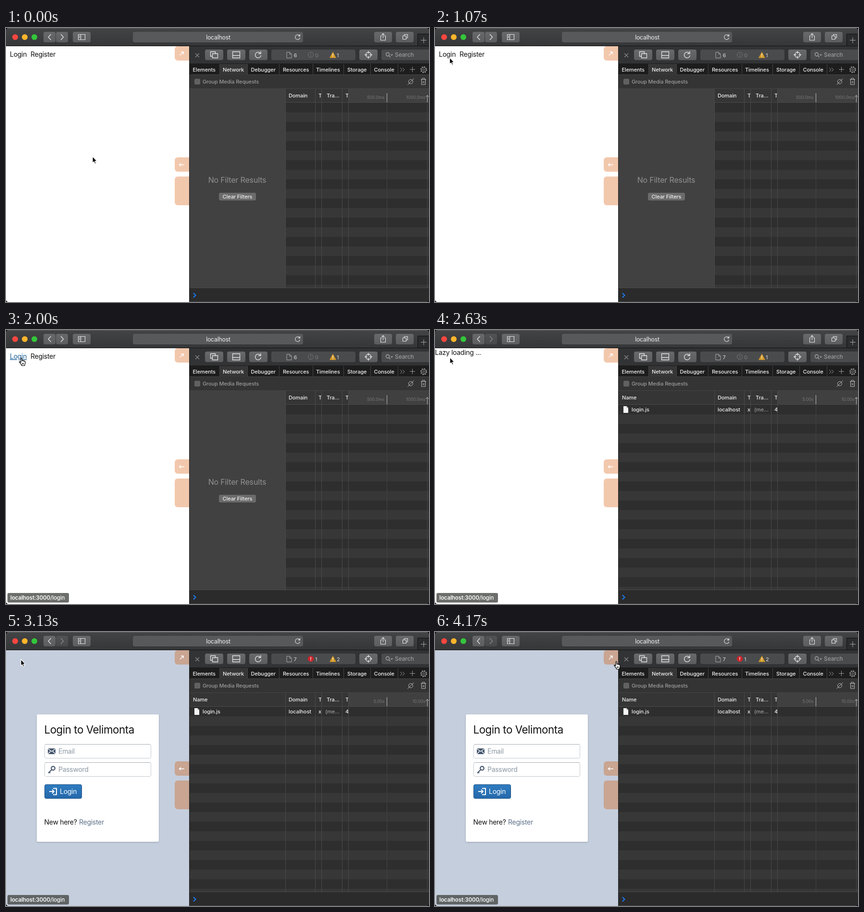
These frames come from a looping animation (880x572 px, 4210 ms). An HTML page:

```html
<!DOCTYPE html>
<html lang="en">
<meta charset="utf-8">
<title>Lazy loading demo</title>
<style>
html, body { margin: 0; width: 100%; height: 100%; overflow: hidden; background: #000 }
svg { display: block; border-radius: 5px; overflow: hidden }
text { font: 500 11px Inter, "Open Sans", sans-serif; letter-spacing: -.01em; fill: #f0f0f0; white-space: pre }
.page { font-size: 14px; font-weight: 400; letter-spacing: -.02em; fill: #111 }
.dim { fill: #9b9b9b }
.tick { font-size: 9px; font-weight: 400; fill: #777; text-anchor: end }
.mid { text-anchor: middle }
.btn rect { fill: url(#key) }
.line { fill: none; stroke: #e6e6e6; stroke-width: 1.3 }
.off { opacity: .45 }
</style>
<svg width="880" height="572" viewBox="0 0 880 572">
  <defs>
    <linearGradient id="bar" x2="0" y2="1"><stop stop-color="#434446"/><stop offset="1" stop-color="#353638"/></linearGradient>
    <linearGradient id="key" x2="0" y2="1"><stop stop-color="#68696b"/><stop offset="1" stop-color="#5c5d5f"/></linearGradient>
    <linearGradient id="blue" x2="0" y2="1"><stop stop-color="#2f7cc0"/><stop offset="1" stop-color="#2468ab"/></linearGradient>
    <pattern id="rows" y="156" width="40" height="40" patternUnits="userSpaceOnUse">
      <path fill="#2e2e2e" d="M0 0h40v20H0z"/><path fill="#373737" d="M0 20h40v20H0z"/>
    </pattern>
    <filter id="soft" x="-10%" y="-10%" width="120%" height="120%"><feDropShadow dx="0" dy="1" stdDeviation="1.5" flood-opacity=".25"/></filter>
  </defs>

  <!-- browser bar -->
  <path fill="url(#bar)" d="M0 0h880v38H0z"/>
  <path fill="#626365" d="M0 0h880v1H0z"/>
  <path fill="#2b2c2e" d="M857 13h23v24h-23z"/>
  <path fill="#111" d="M0 37h880v1H0zM856 13h1v24h-1zM856 12h24v1h-24z"/>
  <circle cx="19" cy="19" r="6" fill="#f9463f"/>
  <circle cx="39" cy="19" r="6" fill="#fdb52b"/>
  <circle cx="59" cy="19" r="6" fill="#34c63b"/>
  <g class="btn">
    <rect x="78" y="8" width="25" height="22" rx="4"/>
    <rect x="139" y="8" width="37" height="22" rx="4"/>
    <rect x="766" y="8" width="37" height="22" rx="4"/>
    <rect x="811" y="8" width="37" height="22" rx="4"/>
  </g>
  <g id="forward" class="btn"><rect x="104" y="8" width="25" height="22" rx="4"/><path class="line" stroke-width="1.6" d="M114 13l5.5 6-5.5 6"/></g>
  <rect x="264" y="8" width="354" height="22" rx="4" fill="#58595b"/>
  <g class="line">
    <path d="M93.500 13l-5.500 6 5.500 6"/>
    <path d="M150.500 13.500h14v11h-14zM155.500 13.500v11M152 16.500h2M152 18.500h2M152 20.500h2" stroke-width="1.100"/>
    <path d="M611 16.500a5 5 0 1 0 .500 4M611.500 13v4h-4" stroke-width="1.100"/>
    <path d="M782 16.500h-2.500v9h10v-9H787M784.500 21v-9M781.500 14.500l3-3 3 3" stroke-width="1.100"/>
    <path d="M825.500 16.500h7v7h-7zM828.500 16v-2.500h7v7H833" stroke-width="1.100"/>
    <path d="M863 25.500h12M869 19.500v12" stroke="#aaa" stroke-width="1"/>
  </g>
  <text class="mid" x="441.500" y="23.500" style="font-size:12.400px;font-weight:400;letter-spacing:-.02em">localhost</text>

  <!-- web page -->
  <path id="paper" d="M0 38h381v534H0z"/>
  <g id="home">
    <text id="link" class="page" x="8" y="60">Login</text>
    <text class="page" x="51" y="60">Register</text>
  </g>
  <text id="lazy" class="page" x="0" y="52">Lazy loading ...</text>
  <g id="login">
    <rect x="64" y="172" width="254" height="266" rx="3" fill="#fff" filter="url(#soft)"/>
    <text class="page" x="79.500" y="212" style="font-size:22.300px">Login to Velimonta</text>
    <g fill="#fff" stroke="#c3c9cf">
      <rect x="80.500" y="234.500" width="221" height="29" rx="3"/>
      <rect x="80.500" y="272.500" width="221" height="29" rx="3"/>
      <path stroke="#a5adb4" d="M82 234.500h218M82 272.500h218"/>
    </g>
    <path fill="#47586f" d="M87 243h16v12H87z"/>
    <path fill="none" stroke="#fff" stroke-width="1.300" d="M87 243.500l8 6 8-6M87 255l5.500-6M103 255l-5.500-6"/>
    <g fill="none" stroke="#47586f" stroke-width="2.200"><circle cx="98" cy="284.500" r="3.800"/><path d="M95 287.500l-7 7M89.500 292l2.500 2.500"/></g>
    <text class="page" x="109" y="254" style="fill:#8a97a3">Email</text>
    <text class="page" x="109" y="292" style="fill:#8a97a3">Password</text>
    <rect x="80.500" y="318.500" width="77" height="29" rx="3" fill="url(#blue)" stroke="#1d4f80"/>
    <path fill="none" stroke="#fff" stroke-width="2" d="M98 326.500h7v13h-7M90 333h9M96 329l4 4-4 4"/>
    <text class="page" x="112" y="338" style="fill:#fff">Login</text>
    <text class="page" x="79.500" y="402">New here?</text>
    <text class="page" x="152" y="402" style="fill:#5c6f88">Register</text>
  </g>
  <g id="tabs">
    <path d="M381 38h-23q-7 0-7 7v16q0 7 7 7h23zM381 270h-23q-7 0-7 7v16q0 7 7 7h23zM381 310h-23q-7 0-7 7v46q0 7 7 7h23z"/>
    <path fill="none" stroke="#fff" stroke-width="1.400" d="M362 57l7-7M364 50h5v5M371 285.500h-10.500M364 282.500l-3.500 3 3.500 3"/>
  </g>
  <g id="status">
    <rect x="3" y="549" width="128" height="20" rx="3" fill="#484a46" fill-opacity=".8"/>
    <text x="9" y="563" style="font-size:11.500px;font-weight:600;fill:#fff">localhost:3000<tspan font-weight="500">/login</tspan></text>
  </g>

  <!-- inspector -->
  <path fill="#323335" d="M381 38h499v534H381z"/>
  <g class="btn">
    <rect x="414" y="45" width="38" height="22" rx="4"/>
    <rect x="460" y="45" width="38" height="22" rx="4"/>
    <rect x="506" y="45" width="38" height="22" rx="4"/>
    <rect x="735" y="45" width="38" height="22" rx="4"/>
  </g>
  <g fill="#4a4b4d"><rect x="552" y="45" width="175" height="22" rx="4"/><rect x="781" y="45" width="110" height="22" rx="4"/></g>
  <g class="line">
    <path stroke="#888" d="M394 53l8 8M402 53l-8 8"/>
    <path d="M429 59h-3.500v-9.500h10V53M429.500 53.500h11v9h-11z"/>
    <path d="M471.500 49.500h15v13h-15zM471.500 57.500h15"/>
    <path d="M529.500 53a6 6 0 1 0 1 4M530 48.500v5h-5"/>
    <path stroke="#aaa" stroke-width="1" d="M584 50.500h6l4 4v8h-10zM590 50.500v4h4"/>
    <circle cx="754" cy="56" r="5.500"/><path d="M754 48v5.500M754 58.500V64M746 56h5.500M756.500 56h5.500"/>
    <g stroke="#aaa"><circle cx="794" cy="55" r="3.500"/><path d="M796.500 57.500l3 3.500M800.500 55l2 2 2-2"/></g>
  </g>
  <text class="dim" x="809" y="60" style="font-size:12px">Search</text>
  <text id="files" x="598.500" y="60.500" style="fill:#c5c5c5"></text>
  <g id="noError" fill="none" stroke="#777"><circle cx="634" cy="56" r="5.500"/><path d="M634 53v4M634 58v1.500"/></g>
  <g id="error"><path fill="#c8252c" d="M631.500 50h5l3.500 3.500v5l-3.500 3.500h-5l-3.500-3.500v-5z"/><path stroke="#fff" stroke-width="1.300" d="M634 52.500v4.500M634 58v1.500"/></g>
  <text id="errors" x="643" y="60.500"></text>
  <path fill="#d59a25" d="M680 49.500l7 13h-14z"/><path stroke="#fff" stroke-width="1.200" d="M680 53.500v4.500M680 59.500v1.500"/>
  <text id="warnings" x="688" y="60.500" style="fill:#c5c5c5"></text>

  <path fill="#1d1d1e" d="M381 74h499v24H381z"/>
  <path fill="#363636" d="M445 75h57v23h-57z"/>
  <path fill="#343434" d="M381 98h499v28H381z"/>
  <path fill="#454545" d="M444 75h1v22h-1zM502 75h1v22h-1zM568 75h1v22h-1zM638 75h1v22h-1zM702 75h1v22h-1zM758 75h1v22h-1zM815 75h1v22h-1zM381 97h64v1h-64zM502 97h378v1H502zM381 126h499v1H381z"/>
  <g id="tabNames"></g>
  <g class="line" stroke="#999" style="stroke:#999;stroke-width:1">
    <path d="M820 83l4 4-4 4M825 83l4 4-4 4M840 86.500h11M845.500 81v11"/>
    <circle cx="869" cy="87" r="2"/><circle cx="869" cy="87" r="4.800"/><circle cx="869" cy="87" r="6" stroke-width="2" stroke-dasharray="2.350"/>
    <g style="stroke:#bbb"><circle cx="842" cy="112" r="4.500"/><path d="M835.500 118.500l13-13M863 107.500h11M866 107v-2h5v2M864.500 108v10h8v-10M866.500 111l4 4M870.500 111l-4 4"/></g>
  </g>
  <rect x="392" y="106" width="12" height="12" rx="2.500" fill="#616161"/>
  <text class="dim" x="409" y="116">Group Media Requests</text>

  <path fill="#353535" d="M381 127h332v29H381z"/>
  <path fill="#404040" d="M713 127h167v29H713z"/>
  <path fill="url(#rows)" d="M381 156h499v386H381z"/>
  <text x="588" y="145">Domain</text>
  <text x="650" y="145">T</text>
  <text x="667" y="145">Tra...</text>
  <text x="706" y="145">T</text>
  <g id="request">
    <text x="389" y="145">Name</text>
    <path fill="#f5f5f5" d="M392 159h6.500l3.500 3.500V173h-10z"/><path fill="#aaa" d="M398.500 159v3.500h3.500z"/>
    <text x="409" y="170">login.js</text>
    <text x="588" y="170">localhost</text>
    <text x="650" y="170">x</text>
    <text class="dim" x="664" y="170">(me...</text>
    <text x="706" y="170">4</text>
  </g>
  <path fill="#4a4a4a" d="M581 127h1v415h-1zM643 127h1v415h-1zM656 127h1v415h-1zM699 127h1v415h-1zM712 127h1v415h-1zM381 155h499v1H381z"/>
  <path fill="#444" d="M792 156h1v386h-1zM876 156h1v386h-1z"/>
  <path fill="none" stroke="#bbb" d="M792.500 136v19M876.500 141v14M873 144l3.500-3.500 3.500 3.500"/>
  <text id="half" class="tick" x="787.500" y="148"></text>
  <text id="full" class="tick" x="872.500" y="148"></text>
  <g id="empty">
    <path fill="#414141" d="M381 127h200v415H381z"/>
    <text class="mid" x="481" y="323" style="font-size:16px;font-weight:400;fill:#929292">No Filter Results</text>
    <rect x="443" y="344" width="77" height="16" rx="3" fill="#6b6b6b"/>
    <text class="mid" x="481.500" y="356">Clear Filters</text>
  </g>

  <path fill="#2b2b2c" d="M381 543h499v29H381z"/>
  <path fill="#4a4a4a" d="M381 542h499v1H381zM381 571h499v1H381z"/>
  <path fill="#222" d="M381 38h1v534h-1z"/>
  <path fill="none" stroke="#1a7df5" stroke-width="2" d="M390 553.500l4.500 4.500-4.500 4.500"/>

  <!-- pointer -->
  <g id="pointer" stroke-linejoin="round">
    <path id="arrow" stroke="#fff" stroke-width="1.200" d="M0 0v13.600l3-2.700 2 4.700 2.200-.9-2-4.600h4.100z"/>
    <path id="hand" transform="translate(-5)" fill="#fff" stroke="#000" stroke-width="1.200" d="M4 10V1.800Q4 .5 5.200.5T6.400 1.800V6.500Q6.500 5.600 7.600 5.700T8.800 6.900Q9 6 10 6.200T11 7.400Q11.400 6.800 12.200 7.100T13 8.600V11Q13 13 11.800 14.500V16.500H5.500V15Q3 12 .8 9.200.3 7.800 1.700 7.900 3 8.600 4 10M7.200 11v3M9.200 11v3"/>
  </g>
</svg>
<script>
const LOOP = 4210, HOVER = 1130, CLICK = 2330, LOADED = 2670;
// pointer stops: time, x, y
const stops = [[0, 180, 268], [570, 16, 114], [1130, 31, 60], [1370, 31, 60], [2000, 32, 58],
  [2200, 31, 57], [3350, 31, 57], [4100, 377, 61], [LOOP, 377, 61]];
const tabs = { Elements: 388.5, Network: 451, Debugger: 509.5, Resources: 576, Timelines: 645, Storage: 710, Console: 765.5 };
const $ = id => document.getElementById(id);
const show = (id, on) => $(id).style.display = on ? '' : 'none';
const write = (id, text) => $(id).textContent = text;

$('tabNames').innerHTML = Object.entries(tabs).map(([name, x]) => `<text x="${x}" y="91">${name}</text>`).join('');

function pointerAt(t) {
  const i = stops.findIndex(s => s[0] > t);
  const [t0, x0, y0] = stops[i - 1], [t1, x1, y1] = stops[i];
  const u = (t - t0) / (t1 - t0), e = u * u * (3 - 2 * u);
  return [x0 + (x1 - x0) * e, y0 + (y1 - y0) * e];
}

function draw(now) {
  const t = now % LOOP, clicked = t >= CLICK, loaded = t >= LOADED;
  const hover = t >= HOVER && !clicked;
  const [x, y] = pointerAt(t);
  const hand = hover || (loaded && x >= 351);

  show('home', !clicked);
  show('lazy', clicked && !loaded);
  show('login', loaded);
  show('status', t >= HOVER);
  show('empty', !clicked);
  show('request', clicked);
  show('error', loaded);
  show('noError', !loaded);
  show('hand', hand);
  show('arrow', !hand);

  $('paper').style.fill = loaded ? '#c5cedd' : '#fff';
  $('tabs').style.fill = loaded ? '#c9a592' : '#f2c8ad';
  $('link').style.fill = hover ? '#1c5f96' : '';
  $('link').style.textDecoration = hover ? 'underline' : '';
  $('forward').setAttribute('class', clicked ? 'btn off' : 'btn');
  $('errors').style.fill = loaded ? '#c5c5c5' : '#777';
  write('files', clicked ? 7 : 6);
  write('errors', loaded ? 1 : 0);
  write('warnings', loaded ? 2 : 1);
  write('half', clicked ? '5.00s' : '500.0ms');
  write('full', clicked ? '10.00s' : '1000.0ms');
  $('pointer').setAttribute('transform', `translate(${x} ${y})`);
}

const start = performance.now();
(function tick() {
  draw(performance.now() - start);
  requestAnimationFrame(tick);
})();
</script>
</html>
```
